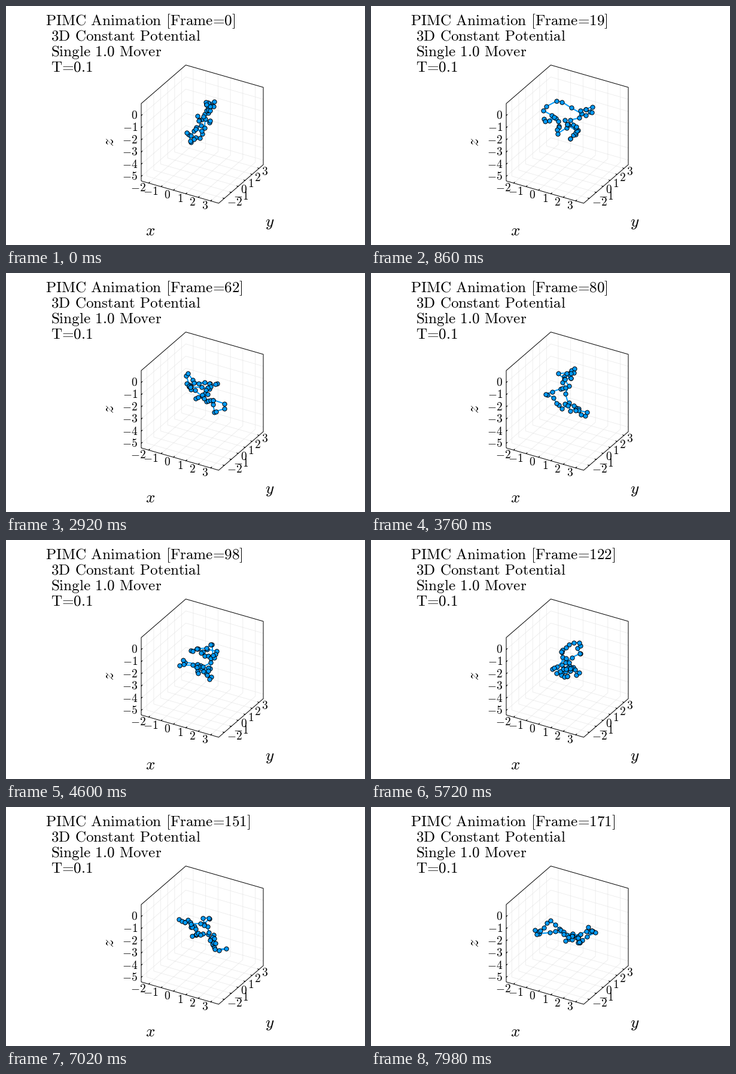
A matplotlib script for the animation above (8 s loop, 600 by 400 pixels).

```python
import numpy as np
import matplotlib.pyplot as plt
from matplotlib.animation import FuncAnimation

W, H, DPI = 600, 400, 100
STEPS, BEADS, MODES = 172, 40, 19
BLUE = "#009afa"
plt.rcParams["mathtext.fontset"] = "cm"

fig = plt.figure(figsize=(W / DPI, H / DPI), dpi=DPI, facecolor="white")
ax = fig.add_axes([0, 0, 1, 1])
ax.set_xlim(0, W)
ax.set_ylim(H, 0)
ax.axis("off")


def px(size):
    return size * 72 / DPI


def roman(s):
    """Upright text with plain word spaces and a tight equals sign."""
    s = s.replace("=", r"\hspace{-0.2}=\hspace{-0.2}")
    return r"$\mathrm{" + s.replace(" ", r"\hspace{0.38}") + "}$"


def label(x, y, s, size, **kw):
    return ax.text(x, y, s, fontsize=px(size), color="black", **kw)


def project(x, y, z):
    """Stage position of a point in the plot's own units."""
    a, b, c = (x + 2.6) / 6.25, (y + 2.8) / 6.4, (z + 5.38) / 6.36
    return np.array([226 + 129.5 * a + 74.5 * b,
                     292.8 + 37.3 * a - 64.5 * b - 129.5 * c])


def polylines(paths, color, width):
    gap = np.full((1, 2), np.nan)
    pts = np.vstack([p for path in paths for p in (np.array(path), gap)])
    ax.plot(pts[:, 0], pts[:, 1], color=color, lw=px(width),
            solid_capstyle="butt")


# Box, grid and ticks
X0, X1, Y0, Y1, Z0, Z1 = -2.6, 3.65, -2.8, 3.6, -5.38, 0.98
spots = range(-2, 4)
heights = range(-5, 1)
grid = [[project(v, Y0, Z0), project(v, Y1, Z0), project(v, Y1, Z1)]
        for v in spots]
grid += [[project(X1, v, Z0), project(X0, v, Z0), project(X0, v, Z1)]
         for v in spots]
grid += [[project(X0, Y0, v), project(X0, Y1, v), project(X1, Y1, v)]
         for v in heights]
polylines(grid, "#ebebeb", 0.8)

outline = [project(*p) for p in (
    (X0, Y0, Z0), (X0, Y0, Z1), (X0, Y1, Z1), (X1, Y1, Z1),
    (X1, Y1, Z0), (X1, Y0, Z0), (X0, Y0, Z0))]
ticks = []
TICK = 19.4
for v in spots:
    p = project(v, Y0, Z0)
    ticks.append([p, p + (2.2, -1.9)])
    label(p[0] - 4.5, p[1] + 13.3, roman(str(v)), TICK, ha="right")
    p = project(X1, v, Z0)
    ticks.append([p, p + (-2.8, -0.8)])
    label(p[0] + 4, p[1] + 11.6, roman(str(v)), TICK, ha="left")
for v in heights:
    p = project(X0, Y0, v)
    ticks.append([p, p + (2.2, -1.9)])
    label(220, p[1] + 5.8, roman(str(v)), TICK, ha="right")
polylines([outline] + ticks, "black", 1)

label(241, 384, "$x$", 27, ha="center")
label(441, 368.5, "$y$", 27, ha="center")
label(173.5, 228, "$z$", 27, ha="center", va="center", rotation=90)

# Title
title = label(66.5, 32, "", 25.2)
for i, line in enumerate(("3D Constant Potential", "Single 1.0 Mover", "T=0.1"), 1):
    label(74.6, 32 + 25.8 * i, roman(line), 25.1)


def simulate():
    """Closed random path of beads: wide modes wander slowly, fine ones fast."""
    rng = np.random.default_rng(11)
    k = np.arange(1, MODES + 1)
    angle = 2 * np.pi * np.outer(np.arange(BEADS), k) / BEADS
    waves = np.hstack([np.cos(angle), np.sin(angle)])
    order = np.tile(k, 2)[:, None]
    size = np.array([0.8, 0.8, 0.6]) / order ** 1.2
    keep = np.exp(-0.05 * order)
    coef = rng.normal(size=size.shape)
    paths = []
    for n in range(STEPS):
        centre = np.array([0.5, 0.5, -1.05 - 1.1 * n / STEPS])
        beads = centre + waves @ (size * coef)
        paths.append(project(*beads.T).T)
        coef = keep * coef + np.sqrt(1 - keep ** 2) * rng.normal(size=size.shape)
    return paths


PATHS = simulate()
chain, = ax.plot([], [], "-o", color=BLUE, lw=px(2), ms=px(7.2),
                 mfc=BLUE, mec="black", mew=px(1), zorder=5)


def step_at(tick):
    """Three steps last 20, 100 and 20 ms, with ticks of 20 ms."""
    cycle, r = divmod(tick, 7)
    return 3 * cycle + (r > 0) + (r > 5)


def update(tick):
    n = step_at(tick)
    pts = np.vstack([PATHS[n], PATHS[n][:1]])
    chain.set_data(pts[:, 0], pts[:, 1])
    title.set_text(roman(f"PIMC Animation [Frame={n}]"))
    return chain, title


anim = FuncAnimation(fig, update, frames=400, interval=20, repeat=True,
                     repeat_delay=0, init_func=lambda: update(0))
plt.show()
```
